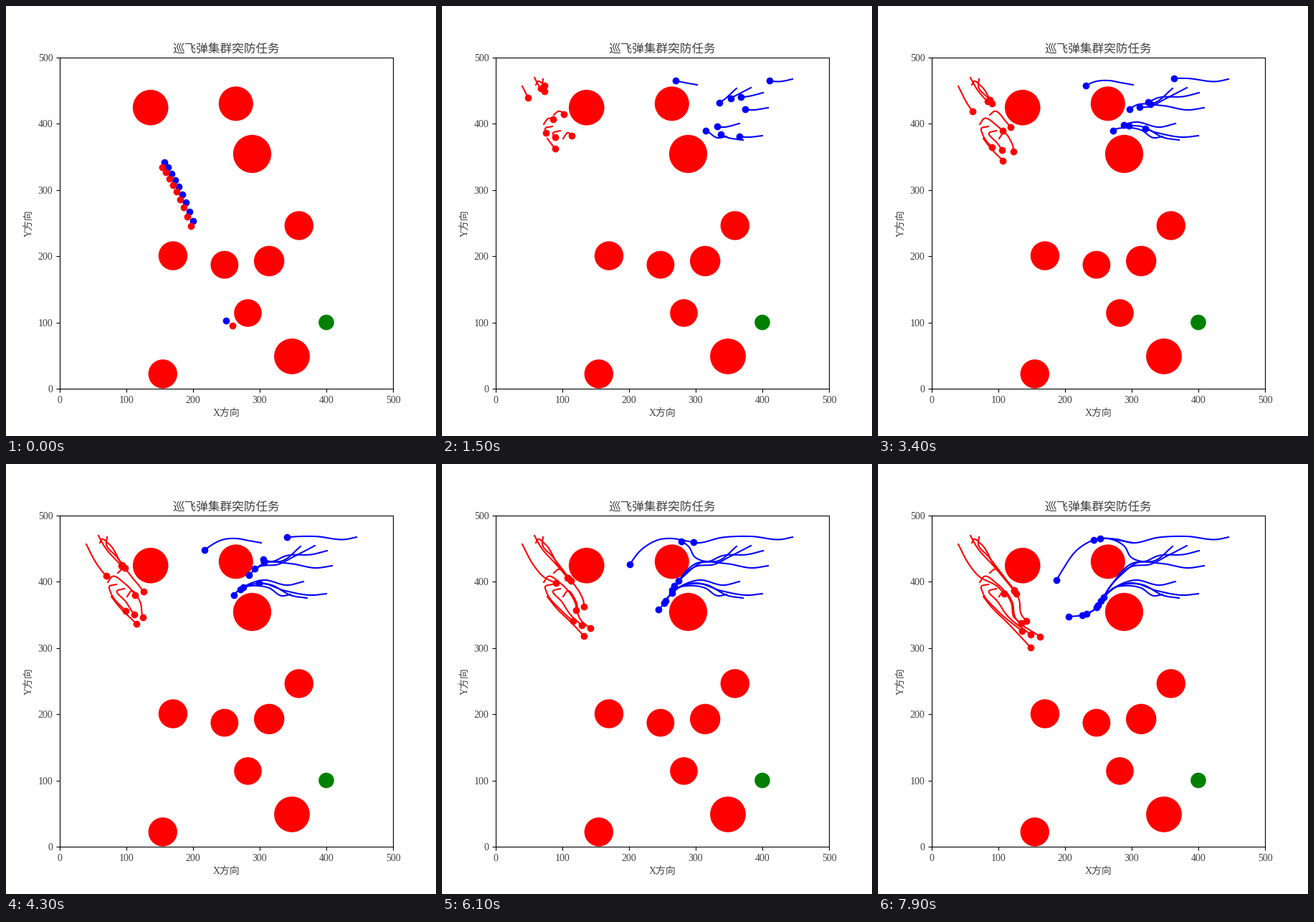
Recreate the animation shown at these times as a matplotlib script. Size 600 px wide and 600 px high, loop 8000 ms.

```python
import matplotlib.pyplot as plt
import numpy as np
from matplotlib.animation import FuncAnimation

FRAMES = 80
STEPS = FRAMES - 1
CRUISE = 2.33  # blue speed in pixels per frame
INK = "0.25"

plt.rcParams["font.family"] = ["Liberation Serif", "Noto Sans CJK JP"]

fig, ax = plt.subplots(figsize=(6, 6), dpi=100)
ax.set(xlim=(0, 500), ylim=(0, 500))
ax.set_title("巡飞弹集群突防任务", color=INK, pad=5)
ax.set_xlabel("X方向", color=INK)
ax.set_ylabel("Y方向", color=INK)
ax.tick_params(labelcolor=INK)

# Overlay measured in stage pixels
stage = fig.add_axes([0, 0, 1, 1])
stage.set(xlim=(0, 600), ylim=(600, 0))
stage.axis("off")


def disc(x, y, r, color="red"):
    stage.add_patch(plt.Circle((x, y), r, color=color, lw=0))


for spot in [(201.7, 141.7, 24.8), (320.8, 136.3, 24), (343.5, 206.4, 26.6),
             (408.8, 306.4, 20.2), (233, 348.5, 20.2), (304.9, 361.1, 19.4),
             (367.2, 355.9, 21.2), (337.5, 428.4, 19.3),
             (399, 488.9, 24.9), (218.8, 513.4, 20.2)]:
    disc(*spot)
disc(447, 441.5, 10.8, "green")


def arc_length(p):
    return np.r_[0, np.cumsum(np.hypot(*np.diff(p, axis=0).T))]


def curve(points):
    """Dense Hermite curve through a few points."""
    p = np.array(points, float)
    t = arc_length(p)
    slope = np.gradient(p, t, axis=0)
    s = np.linspace(0, t[-1], 400)
    k = np.clip(np.searchsorted(t, s, "right") - 1, 0, len(t) - 2)
    h = (t[k + 1] - t[k])[:, None]
    u = (s - t[k])[:, None] / h
    return ((1 + 2 * u) * (1 - u) ** 2 * p[k] + u * (1 - u) ** 2 * h * slope[k]
            + u * u * (3 - 2 * u) * p[k + 1] + u * u * (u - 1) * h * slope[k + 1])


def walk(p, dist):
    s = arc_length(p)
    return np.column_stack([np.interp(dist, s, p[:, i]) for i in (0, 1)])


def steady(points):
    """Constant speed from first to last point over the loop."""
    p = curve(points)
    return walk(p, np.linspace(0, arc_length(p)[-1], STEPS))


def join_lane(points, steps, lane):
    """Brake evenly to reach the lane after some steps, then follow it."""
    p = curve(points + lane)
    s = arc_length(p)
    gate = s[np.argmin(np.hypot(*(p - lane[0]).T))]
    t = np.arange(steps + 1)
    dist = list(CRUISE * t + (gate - CRUISE * steps) * (t / steps) ** 2)
    level = np.abs(np.gradient(p[:, 0], s))
    while len(dist) < STEPS:  # steep stretches are flown slower
        flat = np.interp(dist[-1], s, level)
        dist.append(dist[-1] + CRUISE * max(flat ** 1.5, 0.6))
    return walk(p, dist[:STEPS])


TOP = [(305, 105), (280, 118), (258, 147), (246, 168)]
NORTH = [(327, 167), (311, 191), (302, 203), (284, 212)]
SOUTH = [(331, 172), (317, 184), (308, 197), (302, 203), (284, 211), (262, 213)]

blue = [
    join_lane([(489, 102), (475, 105), (431, 101), (391, 102.5), (355, 110),
               (333, 105)], 80, TOP),
    join_lane([(356, 110), (339, 107), (322, 104)], 25, TOP),
    join_lane([(448, 121), (428, 126), (391, 128), (370, 136), (353, 130),
               (344, 115), (320, 104)], 76, TOP),
    join_lane([(411, 115), (386, 135), (361, 138), (340, 154)], 52, NORTH),
    join_lane([(431, 114), (402, 129), (380, 140), (354, 143)], 57, NORTH),
    join_lane([(455, 142), (434, 145), (397, 139), (354, 139)], 62, NORTH),
    join_lane([(415, 164), (394, 169), (358, 162)], 39, SOUTH),
    join_lane([(397, 182), (385, 184), (367, 173), (342, 170)], 31, SOUTH),
    join_lane([(420, 187), (400, 184), (367, 168)], 42, SOUTH),
    join_lane([(447, 181), (427, 183), (390, 177), (352, 166)], 52, SOUTH),
]

red = [steady(points) for points in (
    [(112, 112), (127, 140), (140, 156), (168, 172), (176, 181)],
    [(129, 100), (138, 116), (161, 142), (190, 176)],
    [(131, 110), (134, 105), (143, 111), (162, 141), (190, 177)],
    [(141, 102), (140, 112), (154, 129), (174, 155), (193, 181)],
    [(156, 152), (162, 147), (179, 162), (197, 190), (200, 210), (207, 219)],
    [(142, 165), (148, 157), (166, 167), (186, 194), (190, 214), (200, 222)],
    [(154, 168), (144, 171), (146, 179), (167, 205), (201, 233)],
    [(165, 174), (155, 177), (167, 192), (179, 210), (213, 238)],
    [(169, 185), (175, 177), (187, 192), (191, 213), (226, 241)],
    [(147, 185), (157, 198), (182, 223), (213, 256)],
)]


def parked(k):
    """Resting spots: a bent column and one straggler."""
    return (221 + 5 * k, 218 + 7 * k + 0.4 * k * k) if k < 9 else (307, 439)


def add_drone(color, rest, path):
    trail, = stage.plot([], [], color=color, lw=1.5)
    dot, = stage.plot([], [], "o", color=color, ms=6)
    return rest, path, trail, dot


drones = [add_drone("blue", parked(k), path) for k, path in enumerate(blue)]
for k, path in enumerate(red):
    x, y = parked(k)
    shift = -3 if k < 9 else 9
    drones.append(add_drone("red", (x + shift, y + 7), path))


def update(i):
    # The loop opens on the resting spots, with no trails
    for rest, path, trail, dot in drones:
        trail.set_data(path[:i].T)
        x, y = path[i - 1] if i else rest
        dot.set_data([x], [y])


anim = FuncAnimation(fig, update, frames=FRAMES, init_func=lambda: update(0),
                     interval=100, repeat=True, repeat_delay=0)
plt.show()
```
